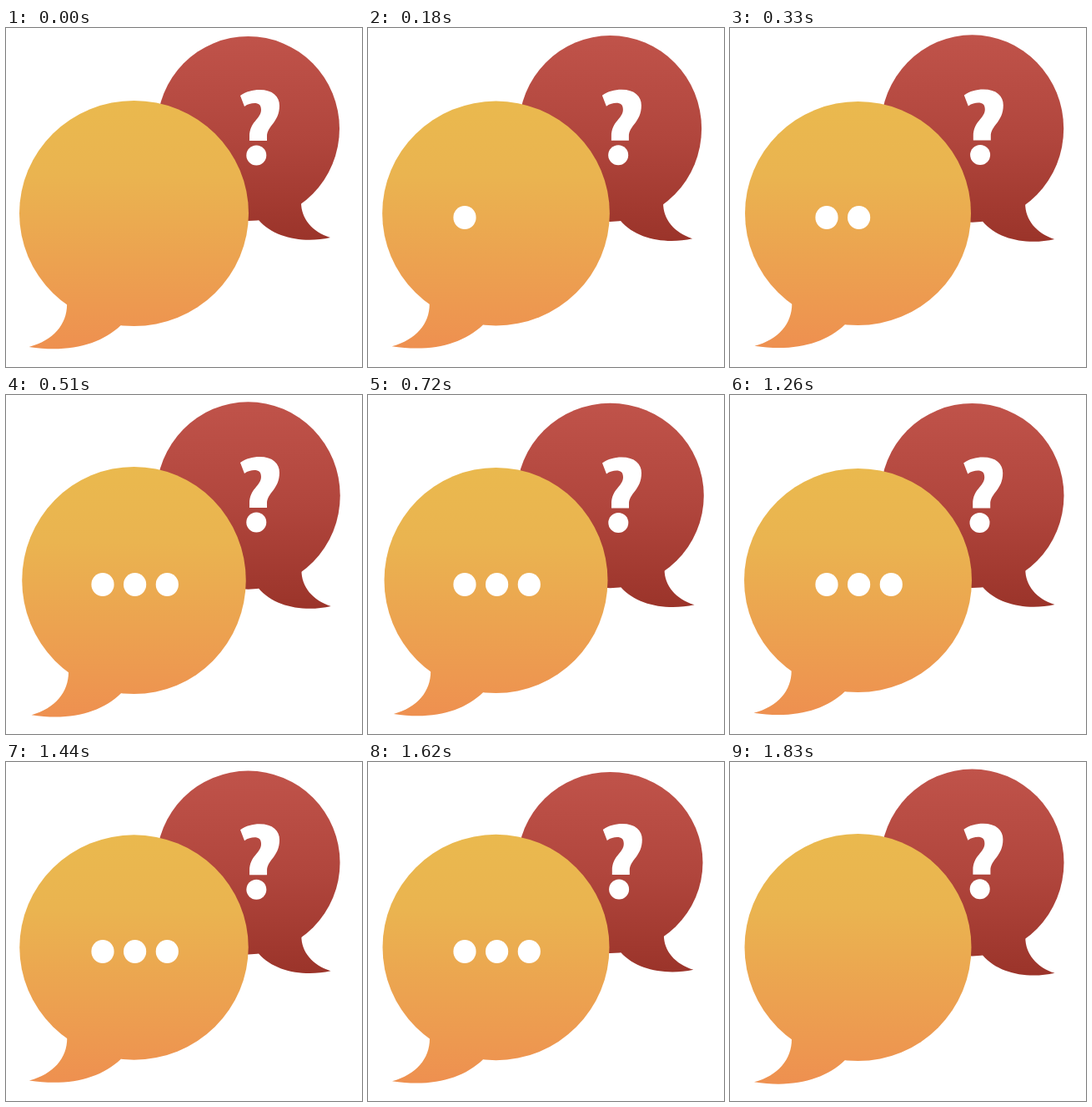
Recreate the animation shown at these times as an HTML page. Size 427 by 406 pixels, loop 1.86 s.

```html
<!DOCTYPE html>
<html lang="en">
<head>
<meta charset="utf-8">
<title>Chat bubbles</title>
<style>
  html, body { margin: 0; width: 100%; height: 100%; overflow: hidden; background: #fff; }
  svg { display: block; width: 427px; height: 406px; }
</style>
</head>
<body>
<svg viewBox="0 0 427 406">
  <defs>
    <linearGradient id="red" gradientUnits="userSpaceOnUse" x1="0" y1="10" x2="0" y2="253">
      <stop offset="0" stop-color="#c0534a"/>
      <stop offset=".5" stop-color="#b1463d"/>
      <stop offset="1" stop-color="#9b342a"/>
    </linearGradient>
    <linearGradient id="orange" gradientUnits="userSpaceOnUse" x1="0" y1="87" x2="0" y2="384">
      <stop offset="0" stop-color="#eab94e"/>
      <stop offset=".3" stop-color="#eab450"/>
      <stop offset="1" stop-color="#ee9050"/>
    </linearGradient>
  </defs>
  <g id="question" fill="url(#red)">
    <ellipse cx="290.5" cy="120.5" rx="109.5" ry="110.5"/>
    <path d="M354 209C354 228 367 244 389 251C358 258 322 252 303 230L310 200Z"/>
  </g>
  <g id="mark" fill="#fff">
    <path d="M281 81C288 76 296 74 304 74C320 74 328 82 328 93C328 113 313 117 313 130V135H292V130C292 112 306 109 306 98C306 92 303 90 298 90C294 90 290 91 286 94Z"/>
    <circle cx="300.3" cy="152.5" r="12"/>
  </g>
  <g id="answer" fill="url(#orange)">
    <ellipse cx="153.5" cy="222" rx="136" ry="135"/>
    <path d="M74 331C74 355 58 374 29 382C75 389 113 380 138 356L120 300Z"/>
  </g>
  <g id="dots" fill="#fff">
    <ellipse cx="116" cy="227" rx="13.6" ry="14"/>
    <ellipse cx="154.6" cy="227" rx="13.6" ry="14"/>
    <ellipse cx="193.3" cy="227" rx="13.6" ry="14"/>
  </g>
</svg>
<script>
const LOOP = 1860, STEP = 30, TYPING = 870, DOT_DELAY = 120;

// time, answer radii x y, question radii x y, mark offset x y
const keys = [
  [0, 137.5, 135, 109.5, 110.5, 0, 0],
  [330, 135.5, 134, 109.7, 112.2, -.2, -.6],
  [540, 134.2, 136.2, 110.3, 112.2, 0, 0],
  [720, 134, 135, 112.3, 110.7, 0, .6],
  [990, 134, 135, 111, 109.5, -.3, 0],
  [1260, 136.5, 134, 110, 110.5, -.8, .5],
  [1410, 137.3, 134.6, 110, 110, 0, .3],
  [1620, 136, 135.2, 111, 108.6, .8, 0],
  [1830, 136, 136.1, 110, 112, -.6, -.3]
];

const el = id => document.getElementById(id);
const dots = [...el("dots").children];

function poseAt(t) {
  const i = Math.max(1, keys.findIndex(k => k[0] >= t));
  const a = keys[i - 1], b = keys[i];
  const u = (t - a[0]) / (b[0] - a[0]);
  const e = u * u * (3 - 2 * u);
  return a.map((v, j) => v + (b[j] - v) * e);
}

function stretch(id, x, y, sx, sy) {
  el(id).setAttribute("transform", `translate(${x} ${y}) scale(${sx} ${sy}) translate(${-x} ${-y})`);
}

function draw(now) {
  const t = Math.floor(now % LOOP / STEP) * STEP;
  const [, ax, ay, qx, qy, mx, my] = poseAt(t);
  stretch("answer", 153.5, 222, ax / 136, ay / 135);
  stretch("question", 290.5, 120.5, qx / 109.5, qy / 110.5);
  el("mark").setAttribute("transform", `translate(${mx} ${my})`);
  const shown = Math.floor(t % TYPING / DOT_DELAY);
  dots.forEach((dot, i) => dot.setAttribute("visibility", i < shown ? "visible" : "hidden"));
}

const start = performance.now();
function frame() {
  draw(performance.now() - start);
  requestAnimationFrame(frame);
}
frame();
</script>
</body>
</html>
```
